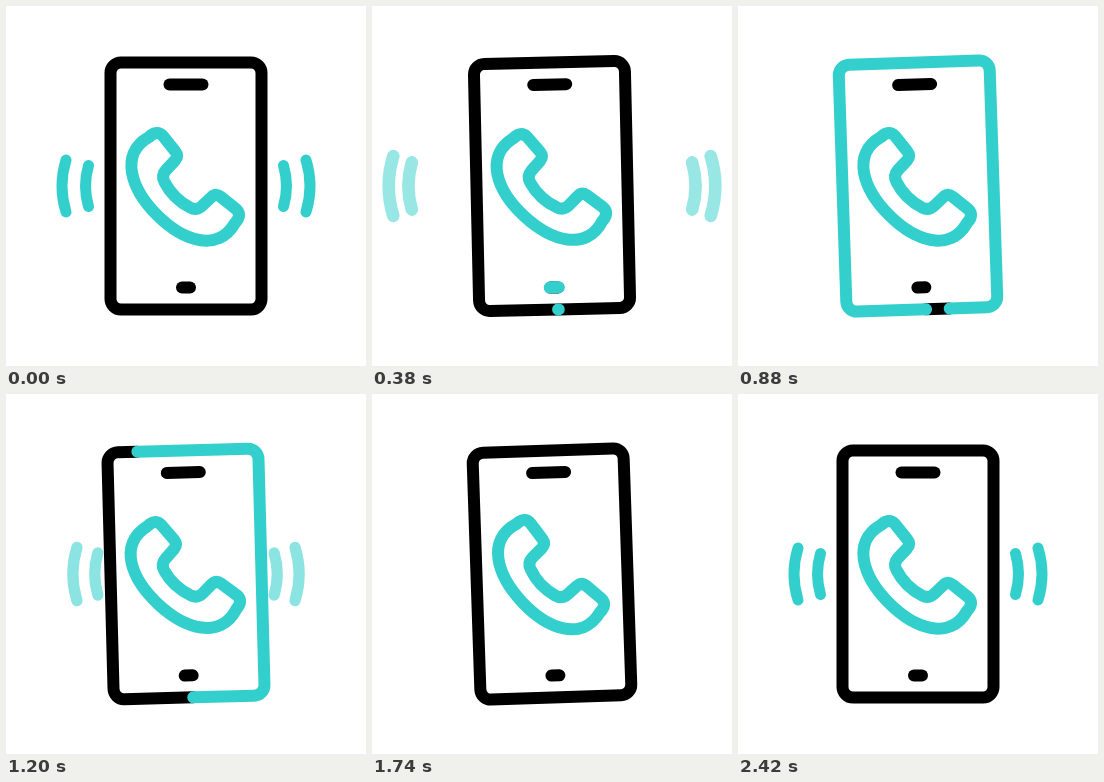
Recreate the animation shown at these times as an HTML page with a canvas. Size 360 by 360 pixels, loop 2600 ms.

```html
<!DOCTYPE html>
<html lang="en">
<head>
<meta charset="utf-8">
<title>Ringing phone</title>
<style>
  html, body { margin: 0; width: 100%; height: 100%; overflow: hidden; background: #fff; }
  canvas { display: block; width: 360px; height: 360px; }
</style>
</head>
<body>
<canvas id="stage" width="360" height="360"></canvas>
<script>
const ctx = document.getElementById('stage').getContext('2d');
const SIZE = 360, MID = SIZE / 2;
const LOOP = 2600, STEP = 20, LAST = 2420;
const TEAL = '#33cfcc', BLACK = '#000', WEIGHT = 12;

const lerp = (a, b, u) => a + (b - a) * u;
const progress = (t, from, to) => Math.min(1, Math.max(0, (t - from) / (to - from)));
const smooth = u => u * u * (3 - 2 * u);
const eased = (t, from, to) => smooth(progress(t, from, to));

// The handset is one half plus its reflection in the rising diagonal.
function makeHandset() {
  const half = new Path2D(
    'M151 209C125 183 113 148 143 131Q151 123.5 157 130L169 145' +
    'Q173 150 169 154.5L160 164Q155 169.5 158.5 176C161 181 164.5 186 169.2 190.8');
  const path = new Path2D(half);
  path.addPath(half, new DOMMatrix([0, -1, -1, 0, SIZE, SIZE]));
  return path;
}

// The body outline runs clockwise from just right of the bottom centre.
function makeBody(halfWidth, halfHeight, radius, startX) {
  const corners = [[-1, 1], [-1, -1], [1, -1], [1, 1]]
    .map(([sx, sy]) => [MID + sx * halfWidth, MID + sy * halfHeight]);
  const path = new Path2D();
  path.moveTo(startX, MID + halfHeight);
  corners.forEach((c, i) => path.arcTo(...c, ...corners[(i + 1) % 4], radius));
  path.closePath();
  const length = 4 * (halfWidth + halfHeight) - (8 - 2 * Math.PI) * radius;
  return { path, length };
}

const handset = makeHandset();
const body = makeBody(75.5, 123.5, 10.5, 184);

// Each pulse slides its arcs outward from their resting place; "inner" is
// how far the inner arc travels compared with the outer one.
const pulses = [
  { start: 0, end: 760, shift: [0, 78], scale: [1, 1.3], alpha: [1, 0], inner: 1.1 },
  { start: 920, end: 1560, shift: [-41, 33], scale: [0.78, 1.34], alpha: [1, 0], inner: 0.85 },
  { start: 1560, end: LAST, shift: [-60, 0], scale: [0.78, 1], alpha: [0, 1], inner: 0.82 }
];

// Swing in degrees, starting and ending at rest.
function shake(t, start, period, cycles, amount) {
  const turns = (t - start) / period;
  return turns < 0 || turns > cycles ? 0 : amount * Math.sin(2 * Math.PI * turns);
}

function tilted(degrees, draw) {
  ctx.save();
  ctx.translate(MID, MID);
  ctx.rotate(degrees * Math.PI / 180);
  ctx.translate(-MID, -MID);
  draw();
  ctx.restore();
}

function line(x1, y1, x2, y2, color) {
  ctx.strokeStyle = color;
  ctx.beginPath();
  ctx.moveTo(x1, y1);
  ctx.lineTo(x2, y2);
  ctx.stroke();
}

// Strokes a straight line between fractions a and b.
function partLine(x1, y1, x2, y2, a, b, color) {
  if (b <= a) return;
  line(lerp(x1, x2, a), lerp(y1, y2, a), lerp(x1, x2, b), lerp(y1, y2, b), color);
}

// Strokes the body outline between fractions a and b.
function partBody(a, b, color) {
  if (b <= a) return;
  ctx.strokeStyle = color;
  if (b - a < 1) ctx.setLineDash([(b - a) * body.length, body.length * 2]);
  ctx.lineDashOffset = -a * body.length;
  ctx.stroke(body.path);
  ctx.setLineDash([]);
}

function drawArc(x, scale, halfHeight, bend) {
  ctx.save();
  ctx.translate(x, 0);
  ctx.scale(scale, scale);
  ctx.lineWidth = 11;
  ctx.beginPath();
  ctx.moveTo(-bend, -halfHeight);
  ctx.quadraticCurveTo(3 * bend, 0, -bend, halfHeight);
  ctx.stroke();
  ctx.restore();
}

function drawPulse(t, { start, end, shift, scale, alpha, inner }) {
  if (t < start || t > end) return;
  const u = progress(t, start, end);
  const moved = lerp(...shift, smooth(u)), size = lerp(...scale, u);
  ctx.strokeStyle = TEAL;
  for (const side of [-1, 1]) {
    ctx.save();
    ctx.globalAlpha = lerp(...alpha, u);
    ctx.translate(MID, MID);
    ctx.scale(side, 1);
    drawArc(122 + moved, size, 26, 2);
    drawArc(99 + moved * inner, size, 20.5, 1.5);
    ctx.restore();
  }
}

function drawPhone(t) {
  ctx.fillStyle = '#fff';
  ctx.fill(body.path);
  const head = eased(t, 370, 940), tail = eased(t, 940, 1500);
  partBody(0, tail, BLACK);
  partBody(head, 1, BLACK);
  partBody(tail, head, TEAL);

  line(163.5, 78.5, 196.5, 78.5, BLACK);
  line(176, 281.5, 184, 281.5, BLACK);
  partLine(175.5, 281.5, 184.5, 281.5, eased(t, 380, 550), eased(t, 200, 370), TEAL);
}

// Three short rays leaving the earpiece.
function drawRays(t) {
  const head = eased(t, 2010, 2170), tail = eased(t, 2170, 2330);
  for (const i of [-1, 0, 1]) {
    const angle = (-40 + 37 * i) * Math.PI / 180;
    const dx = Math.cos(angle), dy = Math.sin(angle);
    partLine(163 + 25 * dx, 137 + 25 * dy, 163 + 37 * dx, 137 + 37 * dy, tail, head, BLACK);
  }
}

function render() {
  const now = performance.now() % LOOP;
  const t = Math.min(LAST, Math.floor(now / STEP) * STEP);
  ctx.fillStyle = '#fff';
  ctx.fillRect(0, 0, SIZE, SIZE);
  ctx.lineWidth = WEIGHT;
  ctx.lineCap = ctx.lineJoin = 'round';
  pulses.forEach(pulse => drawPulse(t, pulse));
  tilted(shake(t, 55, 172.4, 10.5, 1.95), () => drawPhone(t));
  tilted(shake(t, 80, 400, 4.5, 2.2), () => {
    ctx.strokeStyle = TEAL;
    ctx.stroke(handset);
  });
  drawRays(t);
  requestAnimationFrame(render);
}
render();
</script>
</body>
</html>
```
